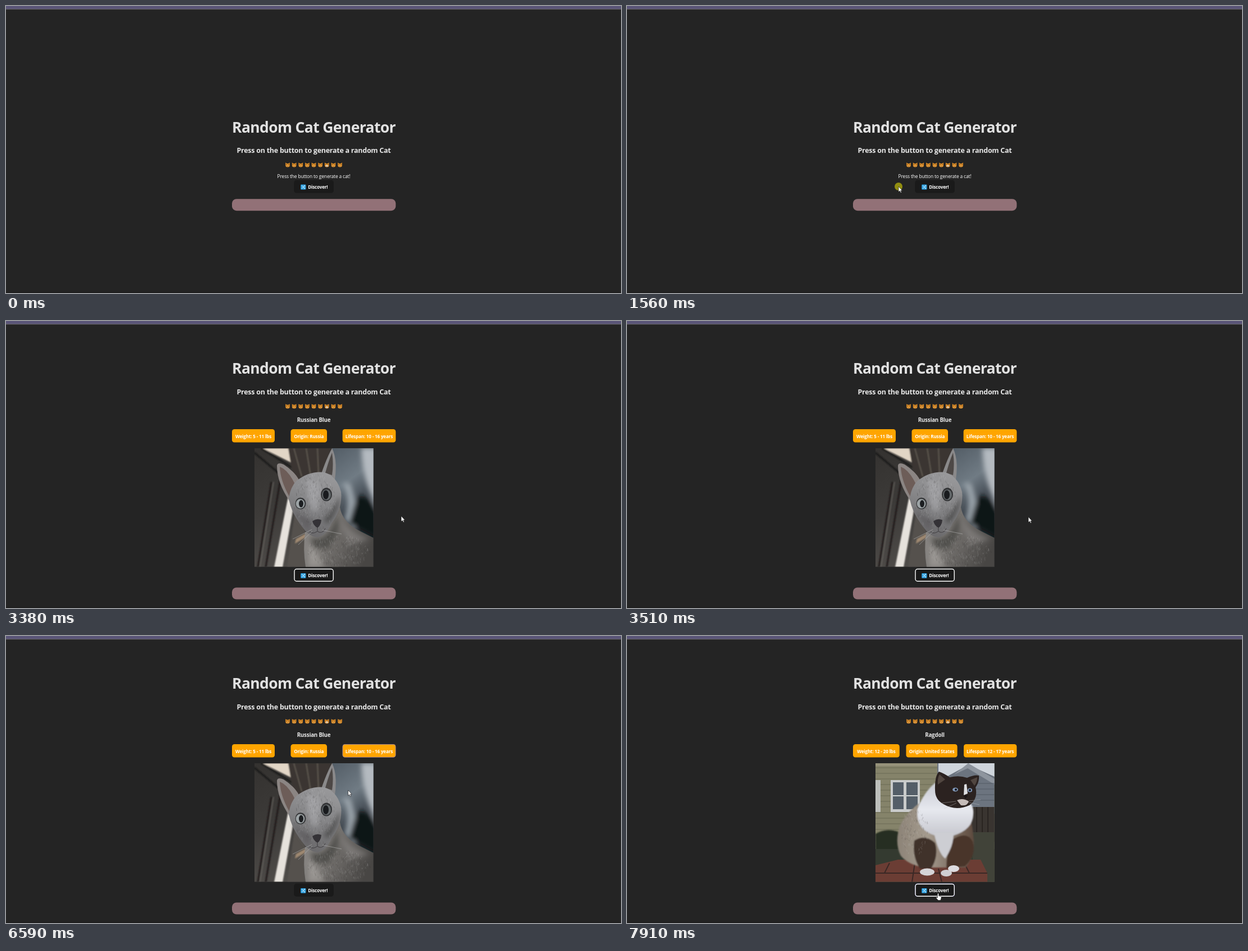
Write an HTML page that moves like this. It is 1094 by 512 pixels and loops after 8 s.

```html
<!DOCTYPE html>
<html lang="en">
<head>
<meta charset="utf-8">
<title>Random Cat Generator</title>
<style>
html, body { margin: 0; width: 100%; height: 100%; overflow: hidden; background: #242424; }
svg { display: block; width: 1094px; height: 512px; }
text { font-family: "Open Sans", "Noto Sans", sans-serif; font-weight: 700; text-anchor: middle; fill: #e9e9e9; }
.title { font-size: 26.5px; letter-spacing: -.64px; fill: #e2e2e2; }
.sub { font-size: 12.45px; letter-spacing: -.23px; }
.para { font-size: 8.4px; letter-spacing: -.13px; font-weight: 400; fill: #fff; }
.breed { font-size: 9.7px; letter-spacing: -.16px; }
.small { font-size: 8.1px; letter-spacing: -.17px; fill: #fff; }
.pointer { fill: #fff; stroke: #111; stroke-width: .6; stroke-linejoin: round; }
</style>
</head>
<body>
<svg viewBox="0 0 1094 512">
  <defs>
    <clipPath id="crop"><rect width="211.5" height="211.5"/></clipPath>
    <linearGradient id="wall" x1="0" y1="0" x2=".4" y2="1">
      <stop offset="0" stop-color="#343230"/><stop offset=".5" stop-color="#3d3b39"/><stop offset="1" stop-color="#514e4b"/>
    </linearGradient>
    <linearGradient id="glass" x1="0" y1="0" x2=".25" y2="1">
      <stop offset="0" stop-color="#535d66"/><stop offset=".35" stop-color="#707b84"/>
      <stop offset=".6" stop-color="#3a4149"/><stop offset="1" stop-color="#14171b"/>
    </linearGradient>
    <linearGradient id="face" x1=".6" y1="0" x2=".3" y2="1">
      <stop offset="0" stop-color="#98989a"/><stop offset=".45" stop-color="#868688"/><stop offset="1" stop-color="#676668"/>
    </linearGradient>
    <linearGradient id="body" x1="0" y1=".2" x2="1" y2=".6">
      <stop offset="0" stop-color="#8d8a87"/><stop offset=".4" stop-color="#787572"/><stop offset="1" stop-color="#484644"/>
    </linearGradient>
    <linearGradient id="coat" x1="0" x2="1">
      <stop offset="0" stop-color="#8c8377"/><stop offset=".4" stop-color="#a59b8e"/><stop offset="1" stop-color="#5d4a3e"/>
    </linearGradient>
    <linearGradient id="ruff" x1="0" y1="0" x2="0" y2="1">
      <stop offset="0" stop-color="#c9cbd3"/><stop offset=".5" stop-color="#e6e8ee"/><stop offset="1" stop-color="#c5c6cd"/>
    </linearGradient>
    <filter id="soft" x="-30%" y="-30%" width="160%" height="160%"><feGaussianBlur stdDeviation="4"/></filter>
    <filter id="fuzz"><feGaussianBlur stdDeviation=".8"/></filter>
  </defs>

  <rect width="1094" height="512" fill="#242424"/>
  <rect width="1094" height="5.2" fill="#5a5578"/>
  <rect y="5.2" width="1094" height="1" fill="#74727c"/>
  <rect y="510" width="1094" height="2" fill="#1e1e1e"/>

  <g id="head">
    <text class="title" x="547.5" y="225.5">Random Cat Generator</text>
    <text class="sub" x="547.5" y="262">Press on the button to generate a random Cat</text>
    <g id="faces"></g>
  </g>
  <text id="hint" class="para" x="547.5" y="307">Press the button to generate a cat!</text>

  <g id="cat0">
    <g class="card"></g>
    <g transform="translate(442 227)" clip-path="url(#crop)">
      <rect width="212" height="212" fill="url(#wall)"/>
      <g filter="url(#fuzz)">
        <path d="M14 0H66V26Z" fill="#e2d6c6"/>
        <path d="M0 8L64 62M12 0L66 34" stroke="#1c1b1a" stroke-width="3"/>
        <path d="M30 60L6 212M46 56L20 212" stroke="#201f1e" stroke-width="3"/>
        <path d="M34 60L10 212" stroke="#67635f" stroke-width="1.5"/>
        <path d="M60 0H136L124 50L70 60Z" fill="#3a3633"/>
        <path d="M70 0L84 50M92 0L100 50M112 0L114 46" stroke="#5f5850" stroke-width="2"/>
        <path d="M64 66L74 80L50 212H35Z" fill="#e6e2dc"/>
        <path d="M74 100L92 155L88 212H58Z" fill="#55514d"/>
        <path d="M74 162L92 152V158L72 170Z" fill="#a08a72"/>
      </g>
      <path d="M138 0H212V212H150Z" fill="url(#glass)"/>
      <g filter="url(#soft)">
        <path d="M190 0H220V112Q192 60 190 0Z" fill="#b4bac0"/>
        <path d="M156 62Q172 90 160 126L178 148Q188 108 170 62Z" fill="#98a1a8"/>
        <path d="M182 88Q200 74 220 120V162L168 134Z" fill="#0f1317"/>
      </g>
      <path d="M90 150Q118 155 152 105Q156 132 188 148L212 160V212H91Q86 180 90 150Z" fill="url(#body)"/>
      <g filter="url(#soft)">
        <path d="M100 158Q128 172 148 120Q156 150 130 180L104 178Z" fill="#454341" opacity=".7"/>
        <path d="M96 172Q112 180 124 212H96Z" fill="#a19e9b" opacity=".7"/>
        <path d="M152 128Q168 150 204 162L168 172Z" fill="#8b8885" opacity=".6"/>
      </g>
      <path d="M63 95Q40 62 40 31Q41 24 52 29Q72 42 80 58Z" fill="#8b8583"/>
      <path d="M62 86Q46 58 45 33Q59 38 71 62Z" fill="#6d5d58"/>
      <path d="M118 48Q128 18 138 0Q148 20 143 56Z" fill="#8a898a"/>
      <path d="M126 44Q132 22 138 8Q141 28 138 48Z" fill="#4d4846"/>
      <path d="M75 58Q98 40 124 43Q147 50 154 78Q157 108 137 134Q127 157 112 159Q96 157 87 143Q66 117 61 91Q63 70 75 58Z" fill="url(#face)"/>
      <g filter="url(#soft)">
        <path d="M92 58Q116 52 118 74L110 116Q100 112 96 88Z" fill="#a9a9ab" opacity=".7"/>
        <path d="M152 84Q154 112 130 136L122 128Q140 108 152 84Z" fill="#4b4a4a" opacity=".8"/>
        <path d="M66 104Q76 124 96 148L102 130Q84 120 66 104Z" fill="#59585a" opacity=".7"/>
      </g>
      <g id="fur0"></g>
      <ellipse cx="82" cy="98.5" rx="9.5" ry="10.5" fill="#37383a"/>
      <ellipse cx="81.5" cy="99" rx="7.8" ry="8.5" fill="#9ca3a5"/>
      <ellipse cx="83" cy="99" rx="4" ry="6.5" fill="#1d1f22"/>
      <ellipse cx="128" cy="82.5" rx="10" ry="12" fill="#333436"/>
      <ellipse cx="128" cy="83" rx="8" ry="9.5" fill="#63686a"/>
      <ellipse cx="127" cy="83" rx="5" ry="8" fill="#191b1e"/>
      <path d="M103 130Q111 124 119 128Q118 138 112 142Q105 138 103 130Z" fill="#343236"/>
      <path d="M112 141V148Q104 154 98 149M112 148Q120 154 126 143" stroke="#4b494c" stroke-width="1.3" fill="none"/>
      <path d="M102 145L68 162M103 148L78 172M121 146L155 153" stroke="#c2c2c2" stroke-width=".5"/>
    </g>
  </g>

  <g id="cat1">
    <g class="card"></g>
    <g transform="translate(442 227)" clip-path="url(#crop)">
      <rect width="212" height="212" fill="#85836a"/>
      <path id="siding" stroke="#6b6a55" stroke-width="1"/>
      <path d="M110 0H212V90H110Z" fill="#6c747f"/>
      <path d="M112 0H212V24L165 3L112 32Z" fill="#cfd5dc"/>
      <path d="M140 20L165 0L212 28V38L164 9Z" fill="#8e959e"/>
      <path d="M170 36H212M172 46H212M174 56H212M176 66H212" stroke="#535a65"/>
      <path d="M0 0H110V5H0Z" fill="#96927a"/>
      <rect x="27" y="30" width="52" height="57" fill="#c9cbcb"/>
      <path d="M31 34H50V82H31ZM55 34H75V82H55Z" fill="#545e68"/>
      <path d="M31 58H50M55 58H75" stroke="#d5d8d8" stroke-width="2"/>
      <rect x="0" y="30" width="9" height="57" fill="#bdbfbb"/>
      <path d="M165 78H212V140H165Z" fill="#393430"/>
      <path d="M180 78V140M190 78V140M200 78V140" stroke="#241f1d" stroke-width="1.5"/>
      <path d="M0 126Q24 112 50 127V180H0Z" fill="#252d21" filter="url(#fuzz)"/>
      <path d="M0 153H212V212H0Z" fill="#343a30"/>
      <path d="M165 123H212V212H180Z" fill="#414339"/>
      <path d="M0 182L40 172H187L199 196V212H0Z" fill="#6b3d34"/>
      <path d="M0 196H199M25 178L16 196M70 178L65 212M112 188L118 212M157 176L167 196" stroke="#3a2825" stroke-width="2"/>
      <g filter="url(#fuzz)">
        <path d="M86 66Q58 83 44 110Q33 141 45 165Q58 181 86 186H160Q179 166 174 130Q171 94 160 74Z" fill="url(#coat)"/>
        <path d="M69 138Q88 126 106 142Q113 165 99 188H79Q65 166 69 138Z" fill="#413329"/>
        <path d="M135 137Q163 119 173 140Q180 164 159 184L126 187Q126 161 135 137Z" fill="#493529"/>
        <path d="M106 35Q87 51 75 80Q71 109 91 122Q112 136 139 129Q173 118 174 92Q176 70 158 65Z" fill="url(#ruff)"/>
        <path d="M104 124H139Q139 148 124 170Q112 161 104 124Z" fill="#cdced3"/>
      </g>
      <g id="fur1"></g>
      <path d="M106 48Q105 23 113 15Q122 18 132 25Q149 21 163 26Q176 20 184 22Q185 34 178 43Q183 64 167 75Q143 86 121 73Q106 65 106 48Z" fill="#2b2220"/>
      <path d="M111 38Q110 26 114 20L124 29ZM169 30L181 25Q181 34 176 40Z" fill="#514640"/>
      <path d="M158 38L162 37L164 54L157 57Z" fill="#dfdfe2"/>
      <path d="M145 66Q155 61 166 68Q163 77 152 75Z" fill="#c5bcb9"/>
      <path d="M156 57H165L160 63Z" fill="#1b1516"/>
      <ellipse cx="142" cy="47" rx="5" ry="3.5" fill="#8097b8"/>
      <ellipse cx="168" cy="48" rx="4" ry="3.5" fill="#8097b8"/>
      <circle cx="143" cy="47" r="2" fill="#12151c"/>
      <circle cx="168" cy="48" r="2" fill="#12151c"/>
      <path d="M143 68L118 71M144 71L122 81M166 67L187 65M166 70L185 74" stroke="#c9c9c9" stroke-width=".4"/>
      <ellipse cx="92" cy="194" rx="13" ry="6.5" fill="#d5d4d7"/>
      <ellipse cx="126" cy="196" rx="10" ry="6" fill="#d0cfd2"/>
      <ellipse cx="139" cy="188" rx="10" ry="6" fill="#dddce0"/>
    </g>
  </g>

  <g id="foot">
    <rect x="512.3" y="310.5" width="70.5" height="23" rx="4.3" fill="#1a1a1a"/>
    <rect id="btnEdge" x="512.6" y="310.8" width="69.9" height="22.4" rx="4" fill="none" stroke="#646cff" stroke-width=".55"/>
    <rect id="ring" x="513" y="311.2" width="69.2" height="21.8" rx="4" fill="none" stroke="#fff" stroke-width="1.4"/>
    <rect x="524.2" y="318.6" width="9.2" height="8.8" rx="1.2" fill="#2a9fe0"/>
    <path d="M525.8 320.9H527.3L530.2 325.1H531.7M525.8 325.1H527.3L530.2 320.9H531.7M530.8 319.8L532 320.9L530.8 322M530.8 324L532 325.1L530.8 326.2" fill="none" stroke="#e9f6ff" stroke-width=".8"/>
    <text class="small" x="554.8" y="326">Discover!</text>
    <rect x="402" y="344.2" width="291.3" height="21" rx="8" fill="#927177"/>
  </g>
  <rect id="tagEdge" x="598.9" y="193.4" width="94.1" height="22.9" rx="4" fill="none" stroke="#646cff" stroke-width=".55"/>

  <g id="mouse">
    <circle id="press" r="7" fill="#918d10"/>
    <path id="arrow" class="pointer" d="M0 0V9.8L2.3 7.8L3.9 11.3L5.4 10.6L3.9 7.2H6.7Z"/>
    <path id="hand" class="pointer" d="M-1.2 1Q0 -.8 1.2 1V4.6L4.9 5.7Q5.9 6.2 5.7 7.3L4.9 11Q4.6 12.6 3 12.6H0L-3.8 8Q-3.6 6.5 -2.3 7L-1.2 7.9Z"/>
  </g>
</svg>

<script>
const LOOP = 8000, STEP = 70, SHIFT = 131.3;
const $ = id => document.getElementById(id);
const show = (id, on) => { $(id).style.display = on ? '' : 'none'; };
const clamp = v => Math.max(0, Math.min(1, v));
const within = (t, spans) => spans.some(([a, b]) => t >= a && t < b);

// Row of small cat faces
$('faces').innerHTML = Array.from({ length: 9 }, (_, i) => {
  const muzzle = i === 6 ? '#f3e6d2' : '#e9a548';
  const mouth = i % 3 === 2 ? 'M-1.5 2.5Q0 1.5 1.5 2.5' : 'M-1.5 1.9Q0 3.4 1.5 1.9';
  return `<g transform="translate(${501 + i * 11.63} 283.6)">
    <path d="M-3.8 -4.3L-1.5 -2.7H1.5L3.8 -4.3V1Q3.8 4 0 4Q-3.8 4 -3.8 1Z" fill="#dd8c26"/>
    <ellipse cy="1.7" rx="2.4" ry="1.7" fill="${muzzle}"/>
    <path d="M-2.3 -.6H-1.1M1.1 -.6H2.3" stroke="#3b2917" stroke-width="1"/>
    <path d="${mouth}" stroke="#70451b" stroke-width=".6" fill="none"/></g>`;
}).join('');

$('siding').setAttribute('d', Array.from({ length: 15 }, (_, i) => `M0 ${8 + i * 10}H112`).join(''));

// Short hairs scattered over an ellipse
let seed = 7;
const rand = () => (seed = seed * 16807 % 2147483647) / 2147483647;
function hairs(id, cx, cy, rx, ry, count) {
  const strands = ['', ''];
  for (let i = 0; i < count; i++) {
    const a = rand() * 2 * Math.PI, r = Math.sqrt(rand());
    const x = cx + rx * r * Math.cos(a), y = cy + ry * r * Math.sin(a);
    strands[i % 2] += `M${x.toFixed(1)} ${y.toFixed(1)}l${(rand() * 3 - 1.5).toFixed(1)} ${(2 + rand() * 3).toFixed(1)}`;
  }
  $(id).innerHTML += strands.map((d, i) =>
    `<path d="${d}" stroke="${i ? '#2c2a29' : '#d4d4d4'}" stroke-width=".6" opacity=".28"/>`).join('');
}
hairs('fur0', 108, 94, 38, 50, 260);
hairs('fur0', 150, 182, 56, 28, 280);
hairs('fur1', 70, 120, 24, 45, 140);

// Breed name, then [left, right, label] of each tag
const cards = [
  ['Russian Blue', [402, 478, 'Weight: 5 - 11 lbs'], [506.5, 571, 'Origin: Russia'], [598.6, 693.3, 'Lifespan: 10 - 16 years']],
  ['Ragdoll', [402, 484.8, 'Weight: 12 - 20 lbs'], [496.5, 587.6, 'Origin: United States'], [599, 693.3, 'Lifespan: 12 - 17 years']]
];
document.querySelectorAll('.card').forEach((el, i) => {
  const [breed, ...tags] = cards[i];
  el.innerHTML = `<text class="breed" x="547.5" y="179.6">${breed}</text>` + tags.map(([a, b, label]) =>
    `<rect x="${a}" y="193.1" width="${b - a}" height="23.5" rx="4.3" fill="#ffa500"/>
     <text class="small" x="${(a + b) / 2}" y="208.5">${label}</text>`).join('');
});

// Pointer strokes: lists of [time, x, y]
const strokes = [
  [[310, 1043, 506], [450, 960, 480], [660, 770, 428], [870, 590, 392], [1080, 513, 381]],
  [[1150, 508, 371], [1290, 493, 343], [1430, 484, 325], [1500, 483, 322], [1640, 483, 322], [1780, 500, 321], [1850, 514, 320], [1900, 525, 320]],
  [[1970, 534, 320], [2170, 548, 320]],
  [[3050, 600, 332], [3120, 651.5, 342.5], [3260, 694, 347], [3400, 712, 349], [3470, 714, 349.5], [3630, 714, 349.5], [3710, 720, 352]],
  [[4700, 720, 352], [4840, 720, 352], [5050, 697, 285], [5260, 674, 220], [5330, 674, 220], [5460, 664, 203]],
  [[6590, 608.5, 275], [6660, 575, 335], [6800, 528, 430], [6940, 504, 494], [7080, 516, 490], [7220, 541, 469], [7360, 553.5, 459]]
];

function pointerAt(t) {
  const keys = strokes.filter(s => s[0][0] <= t).pop();
  if (!keys) return null;
  const start = keys[0][0], now = start + Math.floor((t - start) / STEP) * STEP;
  const n = keys.findIndex(k => k[0] > now);
  if (n < 0) return keys[keys.length - 1].slice(1);
  const [a, x, y] = keys[n - 1], [b, u, v] = keys[n], f = (now - a) / (b - a);
  return [x + (u - x) * f, y + (v - y) * f];
}

const SWAP = [3330, 7840];
const presses = [[1490, 1700], [2630, 2700], [4700, 4840], [7630, 7700]];
const focus = [[2630, 4700], [7630, LOOP]];
const hover = (t, a, b) => clamp((t - a) / 250) - clamp((t - b) / 250);
const inBox = (x, y, l, r, top, bottom) => x >= l && x <= r && y >= top && y <= bottom;

function draw(t) {
  const stage = SWAP.filter(s => t >= s).length, dy = stage ? SHIFT : 0;
  $('head').setAttribute('transform', `translate(0 ${-dy})`);
  $('foot').setAttribute('transform', `translate(0 ${dy})`);
  show('hint', stage === 0);
  show('cat0', stage === 1);
  show('cat1', stage === 2);
  show('ring', within(t, focus));
  $('btnEdge').style.opacity = hover(t, 1920, 3050) + hover(t, 7110, 9000);
  $('tagEdge').style.opacity = hover(t, 5430, 6590);

  const p = pointerAt(t);
  show('mouse', p);
  if (!p) return;
  const [x, y] = p;
  const over = inBox(x, y, 512, 583, 310 + dy, 334 + dy) || (stage && inBox(x, y, 598, 694, 193, 217));
  $('mouse').setAttribute('transform', `translate(${x} ${y})`);
  show('press', within(t, presses));
  show('hand', over);
  show('arrow', !over);
}

const origin = performance.now();
function tick() {
  draw((performance.now() - origin) % LOOP);
  requestAnimationFrame(tick);
}
tick();
</script>
</body>
</html>
```
